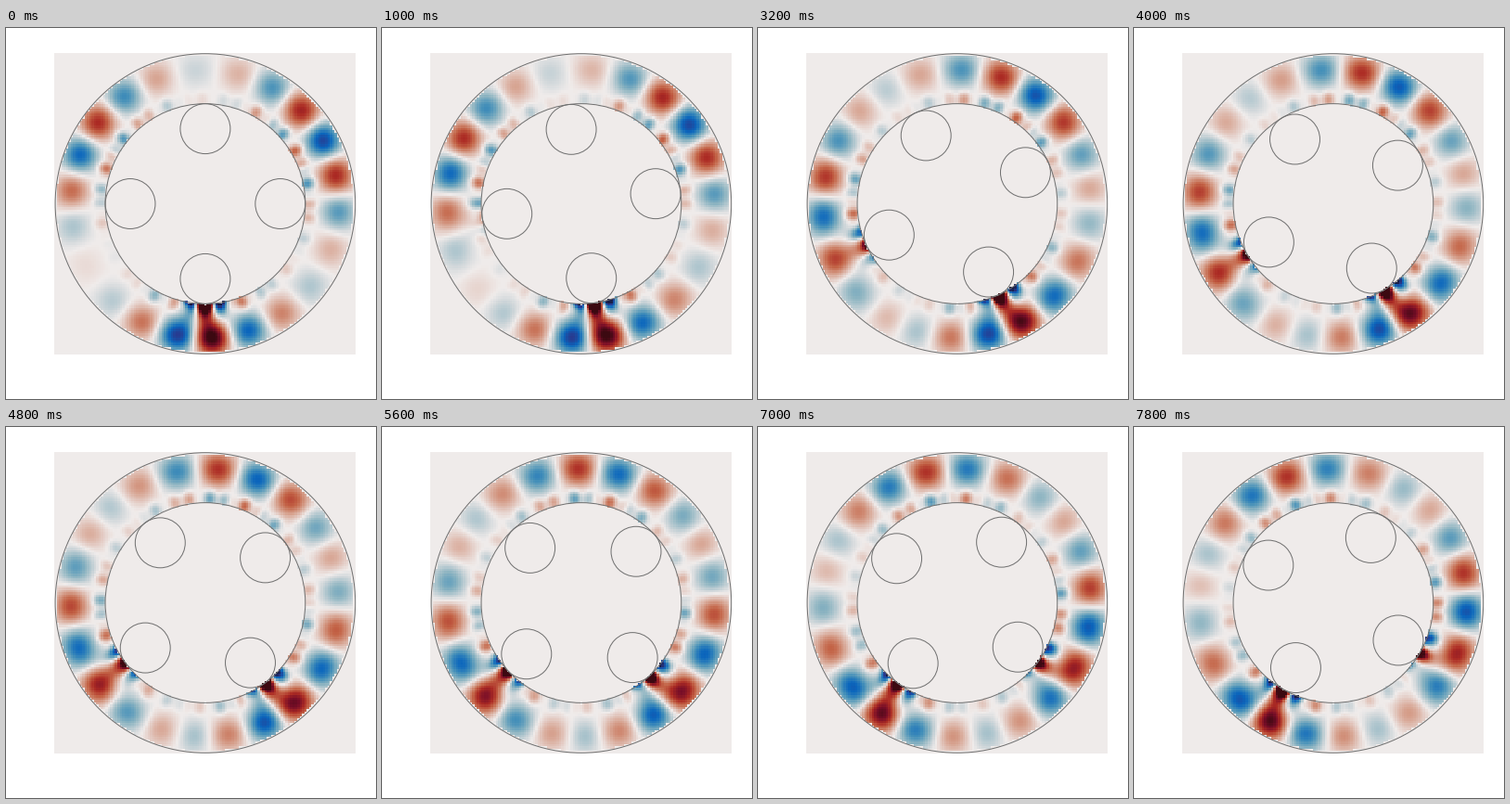
These frames come from a looping animation (399 by 400 pixels, 8 s). A matplotlib script:

```python
import numpy as np
import matplotlib.pyplot as plt
from matplotlib.animation import FuncAnimation
from matplotlib.colors import LinearSegmentedColormap
from matplotlib.patches import Circle, Rectangle

W, H, DPI = 399, 400, 64
CX, CY, R = 214.9, 189.5, 161.8
R_IN, R_ORBIT, R_ROLL = R * 2 / 3, R / 2, R / 6
FRAMES, SWEEP = 40, 60          # rollers travel 60 degrees in one loop
N = 129                         # cells across the ring

# Diverging map: navy - blue - off-white - red - maroon
HEX = ["#171c42", "#293a8f", "#0b66bd", "#4590b9", "#8eb5c2", "#d2d8db",
       "#f0eceb",
       "#e6d2cc", "#d59d89", "#c46548", "#ac2b24", "#780e28", "#3c0911"]
POS = np.sort(np.append(np.arange(12) / 11, 0.5))
CMAP = LinearSegmentedColormap.from_list("balance", list(zip(POS, HEX)), N=512)

axis = np.linspace(-R, R, N)
X, Y = np.meshgrid(axis, axis)
RAD = np.hypot(X, Y)
RING = (RAD < R - 1) & (RAD >= R_IN)
r = RAD[RING]
phi = np.degrees(np.arctan2(X[RING], Y[RING]))   # 0 at the bottom, towards right


def cosd(a):
    return np.cos(np.radians(a))


def bell(x, width):
    return np.exp(-(x / width) ** 2 / 2)


# Radial shapes of the outer lobes, the inner spots and the contact zone
OUTER, INNER = bell(r - 145, 13), bell(r - 113, 6)
CONTACT = np.exp((R_IN - r) / 9)


def response(angle):
    """Ring field for a unit load at angle 0: eleven waves in three beats."""
    a = (angle + 180) % 360 - 180
    beat = 0.41 + 0.30 * cosd(3 * a) + 0.06 * cosd(a - 90) + 0.35 * bell(a, 10)
    wave = beat * cosd(11 * (a - 3.5))
    spots = 0.5 * (1 + 0.5 * cosd(36 * (a - 1))) * (1 - bell(a, 10))
    contact = 3.2 * cosd(18 * a) * bell(a, 7)
    return wave * (OUTER - spots * INNER) + contact * CONTACT


def roller_angles(i):
    return i * SWEEP / (FRAMES - 1) + 90 * np.arange(4)


def field(i):
    z = np.zeros((N, N))
    for a in roller_angles(i):
        z[RING] += max(cosd(a), 0) * response(phi - a)
    return z


def ring(radius):
    return ax.add_patch(Circle((CX, CY), radius, fill=False, ec="#707070",
                               lw=72 / DPI))


fig = plt.figure(figsize=(W / DPI, H / DPI), dpi=DPI, facecolor="white")
ax = fig.add_axes([0, 0, 1, 1])
img = ax.imshow(np.zeros((N, N)), cmap=CMAP, vmin=-1, vmax=1, aspect="auto",
                interpolation="nearest", extent=(52, 377, 352, 27))
ax.set_xlim(0, W)
ax.set_ylim(H, 0)
ax.axis("off")
ax.add_patch(Rectangle((CX - 1.2, CY + R_IN - 1), 2.4, 2.4, fc="white", lw=0))
ring(R)
ring(R_IN)
rollers = [ring(R_ROLL) for _ in range(4)]


def draw(i):
    img.set_data(field(i))
    for c, a in zip(rollers, np.radians(roller_angles(i))):
        c.center = (CX + R_ORBIT * np.sin(a), CY + R_ORBIT * np.cos(a))
    return [img, *rollers]


anim = FuncAnimation(fig, draw, frames=FRAMES, interval=200, repeat=True,
                     repeat_delay=0, blit=False)
plt.show()
```
